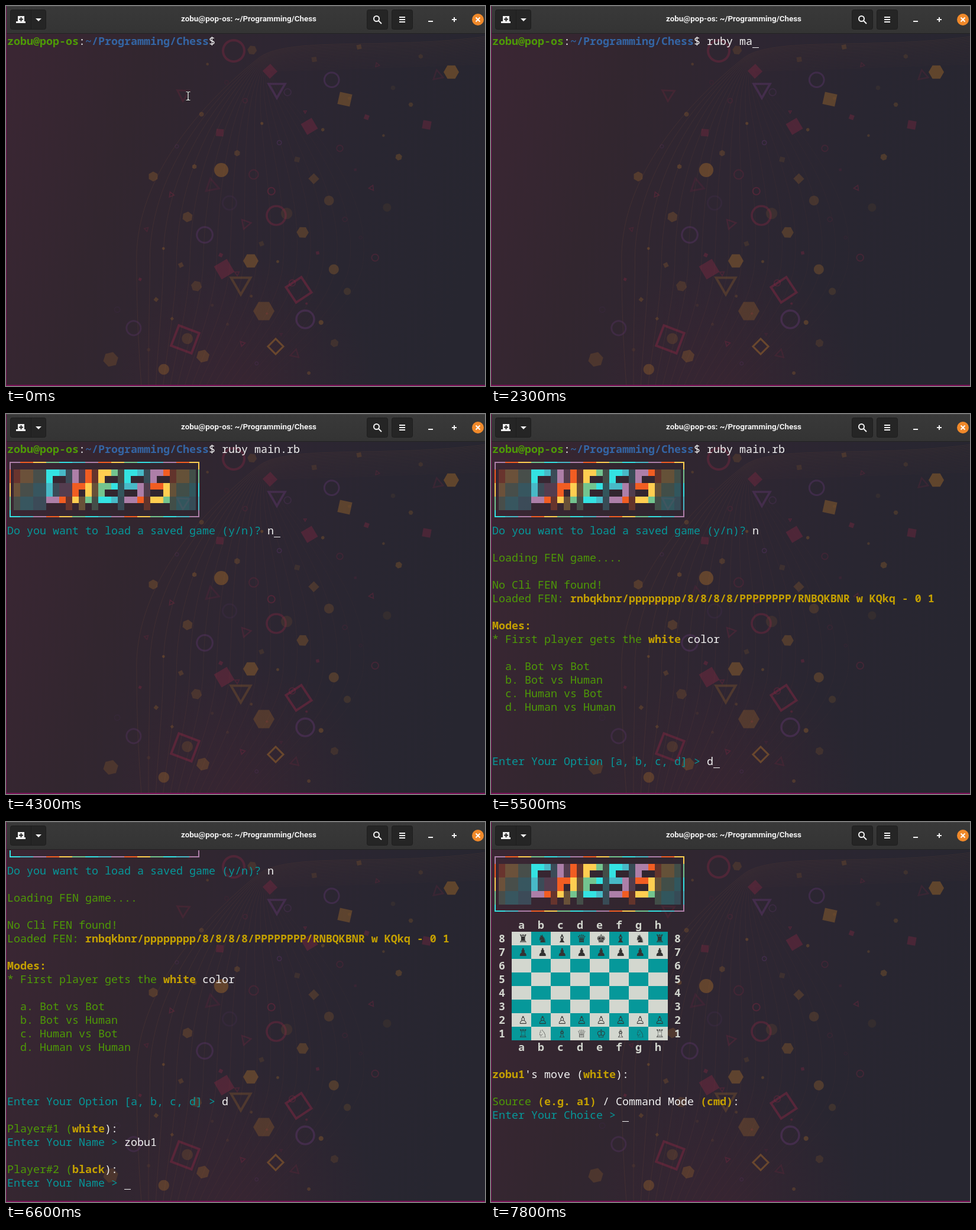
Recreate the animation shown at these times as an HTML page with a canvas. Size 810 px wide and 644 px high, loop 8000 ms.

```html
<!DOCTYPE html>
<html lang="en">
<head>
<meta charset="utf-8">
<title>Terminal chess</title>
<style>
  html, body { margin: 0; width: 100%; height: 100%; overflow: hidden; background: #2d2632; }
  #stage { position: relative; width: 810px; height: 644px; overflow: hidden; }
  #stage > * { position: absolute; left: 0; top: 0; }
  #title {
    width: 821px; top: 12px !important; text-align: center; color: #f2f2f2; white-space: pre;
    font: 700 13.4px/20px Roboto, sans-serif;
  }
  #view { left: 2px !important; top: 48px !important; width: 806px; height: 575px; overflow: hidden; }
  #rows { color: #f2f2f2; font: 18.3333px/21px "Noto Sans Mono", monospace; font-variant-ligatures: none; }
  #rows div { height: 23px; white-space: pre; }
  #rows svg { display: block; }
  b { font-weight: 700; }
  .green { color: #4e9a06; }
  .blue { color: #3465a4; }
  .cyan { color: #06989a; }
  .gold { color: #c4a000; }
  .pale { color: #d3d7cf; }
  .cursor, .square { display: inline-block; box-sizing: border-box; height: 23px; vertical-align: top; }
  .cursor { width: 11px; border-bottom: 1px solid #f2f2f2; }
  .square {
    width: 33px; padding-left: 11px; color: #333; background: #d3d7cf;
    font: 18.3333px/23px "DejaVu Sans", sans-serif;
  }
  .dark { background: #06989a; }
  #edge { box-sizing: border-box; width: 810px; height: 644px; border: solid #7a1257; border-width: 0 0 2px 1px; }
</style>
</head>
<body>
<div id="stage">
  <canvas id="wall" width="810" height="644"></canvas>
  <svg width="810" height="48" fill="none" stroke="#f2f2f2" stroke-width="2">
    <defs>
      <linearGradient id="bar" x2="0" y2="1"><stop stop-color="#393939"/><stop offset="1" stop-color="#343434"/></linearGradient>
    </defs>
    <path d="M0 0H810V46H0Z" fill="url(#bar)" stroke="none"/>
    <path d="M0 .5H810" stroke="#4b4b4b" stroke-width="1"/>
    <path d="M0 46.5H810" stroke="#222" stroke-width="1"/>
    <g fill="#252525" stroke="#1e1e1e" stroke-width="1">
      <rect x="7.5" y="6.5" width="60" height="33" rx="3"/>
      <rect x="610.5" y="6.5" width="35" height="33" rx="3"/>
      <rect x="652.5" y="6.5" width="35" height="33" rx="3"/>
      <path d="M42.5 7V39"/>
    </g>
    <path d="M20 17h11v9h2v3H17v-3h3z" fill="#f2f2f2" stroke="none"/>
    <path d="M25.5 19v7M22 22.5h7" stroke="#252525"/>
    <path d="M50 21h10l-5 5z" fill="#f2f2f2" stroke="none"/>
    <circle cx="626.5" cy="21.5" r="4.5"/>
    <path d="M630 25l5 5M665 19h10M665 23h10M665 27h10M714 26h8M754 23h8M758 19v8"/>
    <circle cx="798" cy="23" r="10" fill="#f0892a" stroke="none"/>
    <path d="M794.5 19.5l7 7m0-7l-7 7" stroke="#fff"/>
  </svg>
  <div id="edge"></div>
  <div id="title">zobu@pop-os: ~/Programming/Chess</div>
  <div id="view"><div id="rows"></div></div>
  <svg id="pointer" width="810" height="644" fill="none">
    <defs>
      <path id="beam" d="M304.5 145.5h2q1.5 0 1.5 2q0-2 1.5-2h2M308 147v11M304.5 159.5h2q1.5 0 1.5-2q0 2 1.5 2h2"/>
    </defs>
    <use href="#beam" stroke="#1a1a1a" stroke-width="3"/>
    <use href="#beam" stroke="#fff" stroke-width="1.2"/>
  </svg>
</div>
<script>
const $ = id => document.getElementById(id);

// ---- Wallpaper seen through the window ----
const g = $('wall').getContext('2d');
const GOLD = '190,122,40', RED = '160,40,72', PLUM = '112,60,130';
const mix = (a, b, u) => a + (b - a) * u;
let seed = 11;
const random = () => (seed = seed * 16807 % 2147483647) / 2147483647;
const pick = list => list[Math.floor(random() * list.length)];

function backdrop() {
  const base = g.createLinearGradient(0, 150, 810, 350);
  ['#3a2633', '#32262f', '#2e2632', '#292631', '#272630'].forEach((color, i) => base.addColorStop(i / 4, color));
  g.fillStyle = base;
  g.fillRect(0, 0, 810, 644);
  const glow = g.createRadialGradient(400, 650, 0, 400, 650, 230);
  glow.addColorStop(0, 'rgba(120,30,50,.14)');
  glow.addColorStop(1, 'rgba(120,30,50,0)');
  g.fillStyle = glow;
  g.fillRect(0, 0, 810, 644);
}

// A sheet of threads: in from the top right, over a fold, down to the bottom.
function ribbon() {
  for (let i = 0; i < 18; i++) {
    const u = i / 17;
    g.strokeStyle = `rgba(${mix(160, 120, u)},${mix(100, 70, u)},60,${mix(.14, .07, u)})`;
    g.beginPath();
    g.moveTo(810, 52 + 46 * u);
    g.bezierCurveTo(640, 75 + 30 * u, 470, 50 + 60 * u, 425 + 20 * u, 90 + 20 * u);
    g.bezierCurveTo(mix(320, 480, u), 175, mix(215, 625, u), 300, mix(221, 603, u), 440);
    g.bezierCurveTo(mix(221, 590, u), 510, mix(224, 500, u), 580, mix(229, 436, u), 644);
    g.stroke();
  }
}

const SIDES = { triangle: 3, square: 4, hexagon: 6, circle: 40 };

function shape(kind, color, alpha, x, y, r, { outline = false, turn = 0 } = {}) {
  const sides = SIDES[kind];
  g.beginPath();
  for (let i = 0; i < sides; i++) {
    const a = turn + i * 2 * Math.PI / sides;
    g.lineTo(x + r * Math.cos(a), y + r * Math.sin(a));
  }
  g.closePath();
  g.fillStyle = g.strokeStyle = `rgba(${color},${alpha})`;
  g.lineWidth = Math.min(4, 1 + r / 6);
  outline ? g.stroke() : g.fill();
}

// Evenly spread pieces that drift left towards the bottom, most of them small.
function confetti(count) {
  for (let i = 0; i < count; i++) {
    const v = (i + random()) / count;
    const across = (i * .618034) % 1 - .5;
    const x = mix(545, 345, v) + across * mix(470, 400, v), y = mix(60, 625, v);
    const r = 2.5 + 11 * random() ** 2;
    const [kind, color, outline] = pick([
      ['hexagon', GOLD, false], ['hexagon', GOLD, false], ['square', RED, false], ['square', GOLD, false],
      ['circle', RED, true], ['circle', PLUM, true], ['circle', GOLD, false], ['triangle', RED, true]
    ]);
    shape(kind, color, mix(.08, .3, random()), x, y, r, { outline, turn: random() * 2 });
  }
}

function landmarks() {
  shape('hexagon', GOLD, .38, 753, 112, 13);
  shape('hexagon', GOLD, .34, 414, 432, 13);
  shape('hexagon', GOLD, .24, 436, 517, 18);
  shape('circle', GOLD, .36, 364, 278, 12);
  shape('square', GOLD, .34, 573, 158, 15, { turn: 1 });
  shape('square', RED, .3, 513, 204, 15, { turn: .25 });
  shape('square', RED, .3, 369, 446, 18, { turn: .25 });
  shape('square', RED, .34, 303, 565, 26, { outline: true, turn: 1.15 });
  shape('square', RED, .36, 495, 481, 22, { outline: true, turn: .2 });
  shape('square', GOLD, .4, 456, 577, 13, { outline: true });
  shape('circle', RED, .28, 385, 76, 18, { outline: true });
  shape('circle', RED, .28, 457, 355, 16, { outline: true });
  shape('circle', PLUM, .32, 506, 531, 15, { outline: true });
  shape('triangle', GOLD, .22, 397, 470, 19, { outline: true, turn: Math.PI / 2 });
  shape('triangle', PLUM, .32, 458, 140, 16, { outline: true, turn: Math.PI / 2 });
}

backdrop();
ribbon();
confetti(85);
landmarks();

// ---- Terminal rows ----
const tint = (name, text) => `<span class="${name}">${text}</span>`;
const bold = (name, text) => `<b class="${name}">${text}</b>`;
const green = text => tint('green', text), cyan = text => tint('cyan', text);
const gold = text => bold('gold', text);

const RAINBOW = ['#34e2e2', '#48b9c7', '#ad7fa8', '#f15d22', '#ffce51', '#73c48f'];
const LETTERING = [
  '░░░░░█▀▀░█░█░█▀▀░█▀▀░█▀▀░░░░',
  '░░░░░█░░░█▀█░█▀▀░▀▀█░▀▀█░░░░',
  '░░░░░▀▀▀░▀░▀░▀▀▀░▀▀▀░▀▀▀░░░░'
];

function bannerRow(row) {
  const rect = (col, x, y, w, h, alpha = 1) =>
    `<rect x="${x}" y="${y}" width="${w}" height="${h}" opacity="${alpha}" fill="${RAINBOW[((col >> 1) + row + 2) % 6]}"/>`;
  const top = row === 0 ? 10 : 0, height = row === 0 ? 13 : row === 4 ? 12 : 23;
  let art = rect(0, 4, top, 2, height) + rect(29, 323, top, 2, height);
  for (let col = 0; col < 30; col++) {
    const x = col * 11;
    if (row % 4 === 0) {
      const left = Math.max(x, 4);
      art += rect(col, left, 10, Math.min(x + 11, 325) - left, 2);
    } else if (col > 0 && col < 29) {
      const cell = LETTERING[row - 1][col - 1];
      art += rect(col, x, 0, 11, cell === '▀' ? 11 : 23, cell === '░' ? .25 : 1);
    }
  }
  return `<svg width="332" height="23" shape-rendering="crispEdges">${art}</svg>`;
}
const banner = [0, 1, 2, 3, 4].map(bannerRow);

function boardRow(rank) {
  const pieces = { 8: '♜♞♝♛♚♝♞♜', 7: '♟'.repeat(8), 2: '♙'.repeat(8), 1: '♖♘♗♕♔♗♘♖' }[rank] || ' '.repeat(8);
  const squares = [...pieces].map((piece, file) =>
    `<span class="square${(file + rank) % 2 ? ' dark' : ''}">${piece}</span>`).join('');
  return bold('pale', ` ${rank} `) + squares + bold('pale', ` ${rank}`);
}
const files = bold('pale', '    ' + [...'abcdefgh'].join('  '));
const board = [files, ...[8, 7, 6, 5, 4, 3, 2, 1].map(boardRow), files];

const player = (n, side) => ['', green(`Player#${n} (`) + gold(side) + '):'];
const setup = [
  '', green('Loading FEN game....'), '', green('No Cli FEN found!'),
  green('Loaded FEN: ') + gold('rnbqkbnr/pppppppp/8/8/8/8/PPPPPPPP/RNBQKBNR w KQkq - 0 1'), '',
  gold('Modes:'), green('* First player gets the ') + gold('white') + ' color', '',
  ...['a. Bot vs Bot', 'b. Bot vs Human', 'c. Human vs Bot', 'd. Human vs Human'].map(s => green('  ' + s)),
  '', '', ''
];
const prompt = bold('green', 'zobu@pop-os') + ':' + bold('blue', '~/Programming/Chess') + '$ ';

// Each keystroke has its time; keys past the last one land together with it.
const typed = (t, text, ...times) =>
  [...text].filter((_, i) => t >= times[Math.min(i, times.length - 1)]).join('');

function screenAt(t) {
  if (t >= 7800) return [
    ...banner, ...board, '', gold('zobu1') + "'s move (" + gold('white') + '):', '',
    green('Source ') + gold('(e.g. a1)') + ' / Command Mode ' + gold('(cmd)') + ':',
    cyan('Enter Your Choice &gt; ')
  ];
  const rows = [prompt + typed(t, 'ruby main.rb', 900, 1100, 1300, 1400, 2000, 2200, 2300, 3000)];
  if (t >= 3000) rows.push(...banner, cyan('Do you want to load a saved game (y/n)? ') + typed(t, 'n', 4300));
  if (t >= 4600) rows.push(...setup, cyan('Enter Your Option [a, b, c, d] &gt; ') + typed(t, 'd', 5500));
  const name = cyan('Enter Your Name &gt; ');
  if (t >= 5600) rows.push(...player(1, 'white'), name + typed(t, 'zobu1', 5900, 6000, 6100, 6200, 6400));
  if (t >= 6600) rows.push(...player(2, 'black'), name + typed(t, 'zobu2', 6900, 7100, 7200, 7300, 7600));
  return rows;
}

const cursorOff = [[0, 500], [3500, 4100], [5100, 5400]];
let shown = '';

function render() {
  const t = performance.now() % 8000;
  const rows = screenAt(t);
  if (!cursorOff.some(([from, to]) => t >= from && t < to)) rows[rows.length - 1] += '<i class="cursor"></i>';
  const html = rows.slice(-25).map(row => `<div>${row}</div>`).join('');
  if (html !== shown) $('rows').innerHTML = shown = html;
  $('pointer').style.display = t < 900 ? '' : 'none';
  requestAnimationFrame(render);
}
render();
</script>
</body>
</html>
```
